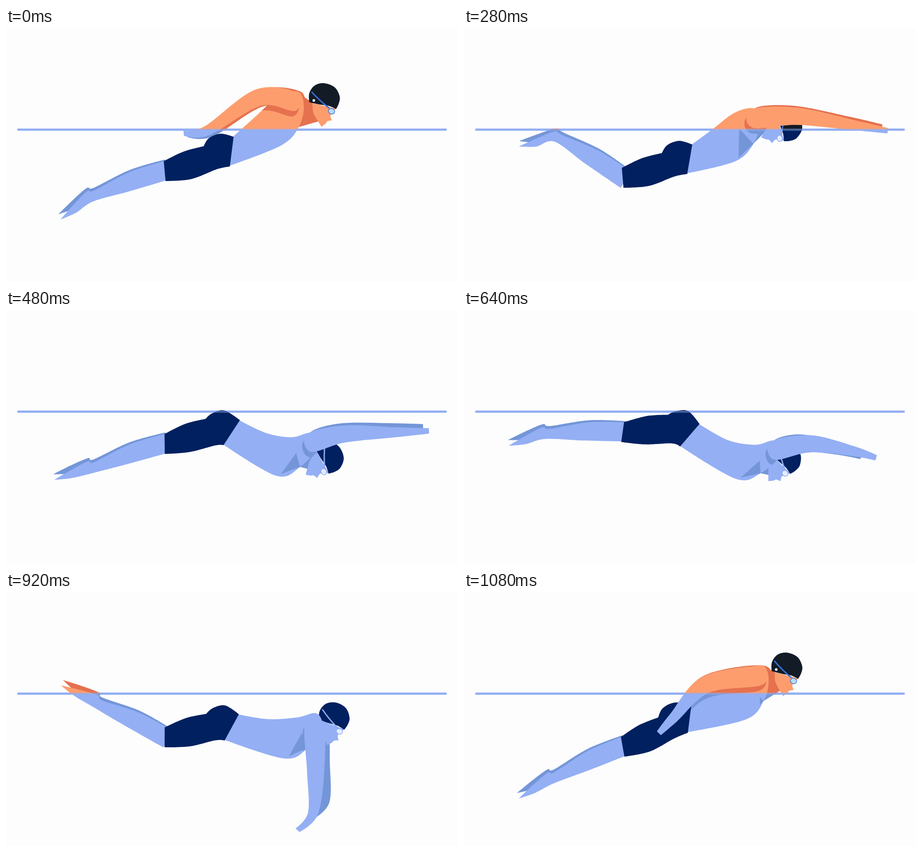
Write an HTML page with a canvas that moves like this. It is 997 px wide and 561 px high and loops after 1120 ms.

```html
<!DOCTYPE html>
<html lang="en">
<head>
<meta charset="utf-8">
<title>Butterfly stroke</title>
<style>
html, body { margin: 0; width: 100%; height: 100%; overflow: hidden; background: #fdfdfd; }
canvas { display: block; }
</style>
</head>
<body>
<canvas id="stage" width="997" height="561"></canvas>
<script>
const ctx = document.getElementById('stage').getContext('2d');
const LOOP = 1120, STEP = 40, SURFACE = 224.5, DEG = Math.PI / 180;
const NAVY = '#00205f';
const AIR = { light: '#fd9d6d', dark: '#e5714f', cap: '#121b26', strap: '#3a6fd8', lens: '#b4ddf6', badge: '#e8eaf0' };
const WATER = { light: '#94aff4', dark: '#7496d8', cap: NAVY, strap: '#8ba8ee', lens: '#e3ebfd', badge: NAVY };

// Skeleton: joint positions and angles (degrees) at the key times.
const TIMES = [0, 120, 280, 480, 760, 920, 1080];
const TRACKS = {
  waistY: [273, 279, 290, 271, 285, 299, 278],
  kneeY: [316, 315, 331, 296, 263, 321, 342],
  shin: [19, -6, -32, 18, -18, -27, 24],
  foot: [36, 43, 12, 18, 11, -26, 31],
  shoulderX: [640, 640, 635, 668, 685, 680, 655],
  shoulderY: [163, 170, 200, 294, 310, 290, 185],
  elbowX: [556, 678, 735, 745, 764, 683, 533],
  elbowY: [154, 159, 195, 274, 315, 395, 205],
  wristX: [443, 690, 862, 860, 835, 677, 462],
  wristY: [227, 174, 215, 270, 357, 489, 278],
  handX: [392, 665, 935, 933, 859, 643, 430],
  handY: [232, 200, 227, 267, 387, 526, 312],
  farX: [8, 5, -13, -13, -38, 25, 5],
  farY: [3, -5, -8, -9, -2, -25, -4],
  headX: [702, 707, 716, 714, 712, 724, 712],
  headY: [152, 170, 214, 324, 309, 274, 164],
  tilt: [0, 20, 60, 48, 20, 8, 2]
};

const clamp = v => Math.max(0, Math.min(1, v));
const mix = (a, b, u) => a.map((v, k) => v + (b[k] - v) * u);
const shift = (p, dx, dy) => [p[0] + dx, p[1] + dy];
const angle = (a, b) => Math.atan2(b[1] - a[1], b[0] - a[0]) / DEG;

// Maps (distance along, distance to the left) to the stage.
function frame(origin, degrees) {
  const cos = Math.cos(degrees * DEG), sin = Math.sin(degrees * DEG);
  return (along, side) => [origin[0] + along * cos + side * sin, origin[1] + along * sin - side * cos];
}

// Cubic interpolation through the key values
function sample(keys, t) {
  const last = TIMES.length - 1;
  let i = 0;
  while (i < last - 1 && t >= TIMES[i + 1]) i++;
  const span = TIMES[i + 1] - TIMES[i], u = (t - TIMES[i]) / span;
  const slope = j => {
    const a = Math.max(j - 1, 0), b = Math.min(j + 1, last);
    return (keys[b] - keys[a]) / (TIMES[b] - TIMES[a]) * span;
  };
  const d = keys[i + 1] - keys[i], m = slope(i), n = slope(i + 1);
  return keys[i] + u * (m + u * (3 * d - 2 * m - n + u * (m + n - 2 * d)));
}

// Smooth closed outline; the points listed in corners stay sharp.
function outline(pts, corners = []) {
  const n = pts.length, path = new Path2D();
  const at = i => pts[(i + n) % n];
  const handle = (i, sign) => {
    if (corners.includes(i % n)) return at(i);
    const a = at(i - 1), b = at(i + 1);
    return shift(at(i), sign * (b[0] - a[0]) / 6, sign * (b[1] - a[1]) / 6);
  };
  path.moveTo(...at(0));
  for (let i = 0; i < n; i++) path.bezierCurveTo(...handle(i, 1), ...handle(i + 1, -1), ...at(i + 1));
  return path;
}

function fill(path, color) {
  ctx.fillStyle = color;
  ctx.fill(path);
}

function polygon(pts) {
  return outline(pts, [...pts.keys()]);
}

function legPath(knee, shin, foot) {
  const s = frame(knee, 180 - shin), ankle = s(166, 0), f = frame(ankle, 180 - foot);
  return outline([
    s(-8, -21), s(74, -23), s(160, -10), f(6, -16), f(45, -10), f(90, 0),
    f(53, 8), s(170, 12), s(88, 17), s(-8, 21)
  ], [0, 5, 9]);
}

function armPath(joints) {
  const radii = [20, 19, 11, 6], left = [], right = [];
  joints.forEach((p, i) => {
    const across = frame(p, angle(joints[Math.max(i - 1, 0)], joints[Math.min(i + 1, 3)]));
    left.push(across(0, radii[i]));
    right.unshift(across(0, -radii[i]));
  });
  return outline([...left, ...right], [3, 4]);
}

// Derives every outline from the skeleton.
function buildSwimmer(t) {
  const k = {};
  for (const name in TRACKS) k[name] = sample(TRACKS[name], t);
  const joint = name => [k[name + 'X'], k[name + 'Y']];
  const waist = [498, k.waistY], knee = [350, k.kneeY];
  const shoulder = joint('shoulder'), hand = joint('hand'), head = joint('head');

  const thighAngle = angle(knee, waist);
  const lean = 34 + (angle(waist, shoulder) + thighAngle) / 2;
  const arch = lean / 4 - 2;
  const waistEdge = frame(waist, lean), kneeEdge = frame(knee, thighAngle * 0.7 + 6);
  const thigh = frame(knee, thighAngle);
  const shorts = outline([
    kneeEdge(0, 22), thigh(52, 30 + arch), thigh(98, 29 + arch * 1.7), thigh(114, 43 + arch), thigh(142, 45 + arch),
    waistEdge(0, 33), waistEdge(0, -33), thigh(110, arch - 28), thigh(51, arch - 33), kneeEdge(0, -22)
  ], [0, 2, 5, 6, 9]);

  const blade = shift(shoulder, -38, -13);
  const chest = frame(shoulder, lean - 13)(0, -56);
  const ribs = frame(shoulder, lean + 12)(0, -102);
  const back = shift(mix(waistEdge(0, 33), blade, 0.5), 0, lean * 0.4 - 4);
  const torso = outline([
    waistEdge(-2, 32), back, blade, shift(shoulder, 5, -22), shift(shoulder, 17, 10), chest, ribs, waistEdge(-2, -32)
  ], [0, 7]);

  const armpit = shift(shoulder, -28, 22);
  const depth = clamp((shoulder[1] - 180) / 20);
  const shade = polygon([mix(chest, armpit, depth), chest, mix(chest, ribs, depth * 0.8)]);

  const onHead = frame(head, k.tilt);
  const neck = polygon([shift(shoulder, 5, -20), onHead(-25, -14), onHead(-12, -54), chest]);

  const arm = [shoulder, joint('elbow'), joint('wrist'), hand];
  const farArm = arm.map((p, i) => i ? shift(p, k.farX * (i > 1 ? 1 : 0.5), k.farY * (i > 1 ? 1 : 0.5)) : shift(p, 8, -3));

  return {
    shorts, torso, shade, neck, head, shoulder, tilt: k.tilt,
    leg: legPath(knee, k.shin, k.foot),
    farLeg: legPath(shift(knee, 0, -3), k.shin - 1.2, k.foot - 4),
    arm: armPath(arm), farArm: armPath(farArm),
    foreshortening: clamp(1.5 - Math.hypot(hand[0] - shoulder[0], hand[1] - shoulder[1]) / 60)
  };
}

const capPath = outline([[-33, 12], [-33, -8], [-21, -25], [0, -30], [23, -21], [34, -1], [32, 15], [26, 27], [10, 20], [-10, 17]], [0, 7]);
const facePath = outline([[-26, 14], [-24, 35], [-13, 55], [-6, 66], [3, 59], [7, 54], [17, 52], [14, 40], [26, 26]], [0, 3, 6, 8]);

function drawHead(position, tilt, c) {
  ctx.save();
  ctx.translate(...position);
  ctx.rotate(tilt * DEG);
  fill(facePath, c.light);
  fill(capPath, c.cap);
  ctx.strokeStyle = c.strap;
  ctx.lineWidth = 3;
  ctx.beginPath();
  ctx.moveTo(-28, -11);
  ctx.quadraticCurveTo(-12, 7, 11, 25);
  ctx.stroke();
  ctx.beginPath();
  ctx.ellipse(16, 32, 7, 6, 0.3, 0, 7);
  ctx.fillStyle = c.lens;
  ctx.fill();
  ctx.lineWidth = 1.4;
  ctx.stroke();
  ctx.beginPath();
  ctx.arc(-23, 8, 3, 0, 7);
  ctx.fillStyle = c.badge;
  ctx.fill();
  ctx.restore();
}

function drawSwimmer(s, c) {
  fill(s.farLeg, c.dark);
  fill(s.leg, c.light);
  fill(s.farArm, c.dark);
  fill(s.neck, c.dark);
  drawHead(s.head, s.tilt, c);
  fill(s.torso, c.light);
  fill(s.shade, c.dark);

  // shadow of the arm on the torso
  ctx.save();
  ctx.clip(s.torso);
  ctx.translate(-4, 12);
  fill(s.arm, c.dark);
  ctx.restore();

  fill(s.shorts, NAVY);
  fill(s.arm, c.light);

  // folds that show while the arm points at the viewer
  ctx.globalAlpha = s.foreshortening;
  for (let i = 0; i < 4; i++) {
    const at = (x, y) => shift(s.shoulder, x + 11 * i, y + 10 * i);
    fill(polygon([at(-37, 8), at(-33, 16), shift(s.shoulder, 34, 12 * i - 20)]), c.dark);
  }
  ctx.globalAlpha = 1;
}

function drawLayer(top, bottom, swimmer, colors) {
  ctx.save();
  ctx.beginPath();
  ctx.rect(0, top, 997, bottom - top);
  ctx.clip();
  drawSwimmer(swimmer, colors);
  ctx.restore();
}

function drawLine(alpha) {
  ctx.globalAlpha = alpha;
  ctx.fillStyle = '#94aff3';
  ctx.fillRect(25, 222, 947, 5);
  ctx.globalAlpha = 1;
}

function render() {
  const t = Math.floor(performance.now() % LOOP / STEP) * STEP;
  const swimmer = buildSwimmer(t);
  ctx.fillStyle = '#fdfdfd';
  ctx.fillRect(0, 0, 997, 561);
  drawLine(1);
  drawLayer(0, SURFACE, swimmer, AIR);
  drawLayer(SURFACE, 561, swimmer, WATER);
  drawLine(0.4);
  requestAnimationFrame(render);
}
render();
</script>
</body>
</html>
```
